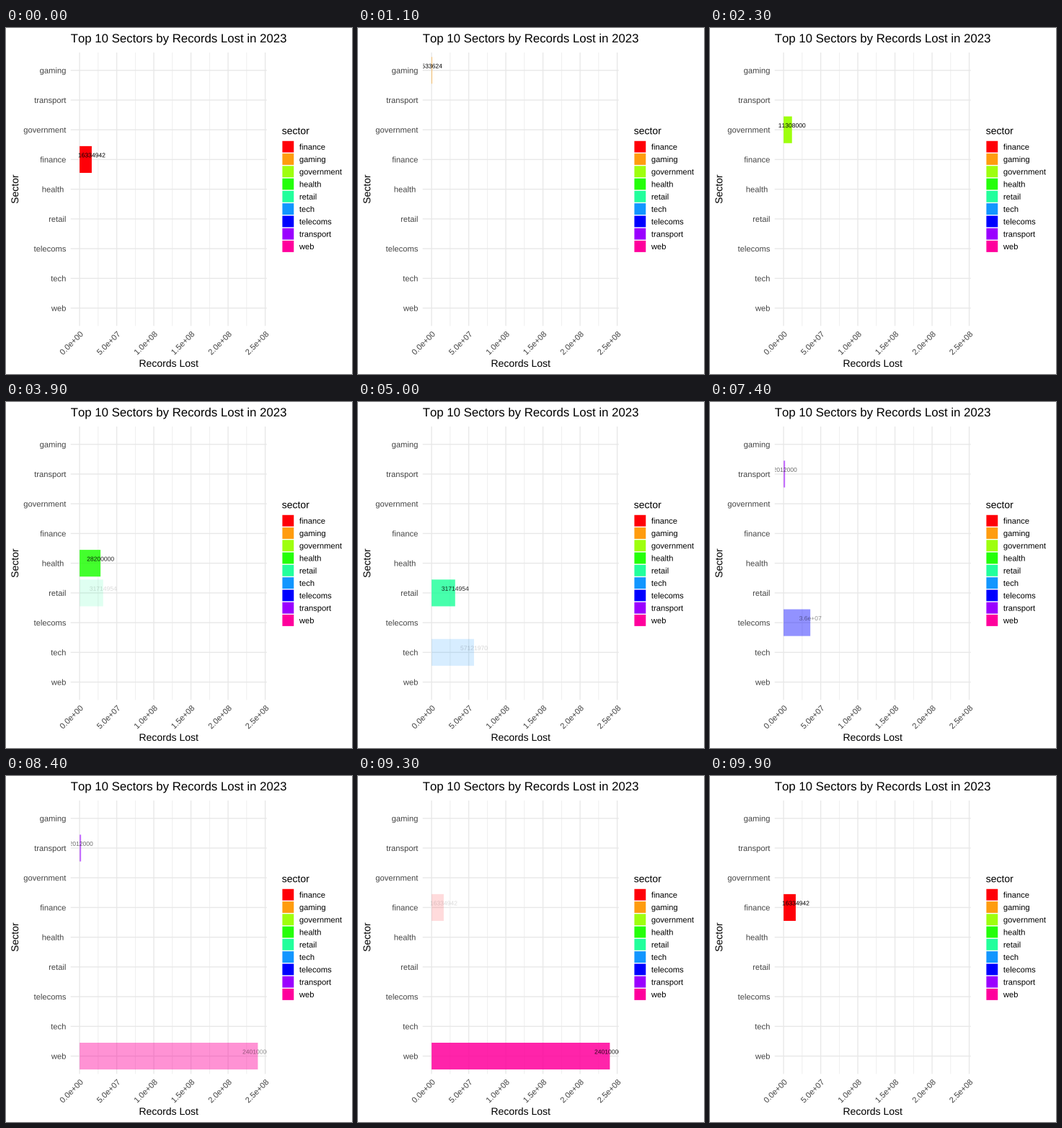
A matplotlib script for the animation above (10000 ms loop, 480 by 480 pixels).

```python
import matplotlib.pyplot as plt
from matplotlib.animation import FuncAnimation
from matplotlib.patches import PathPatch, Rectangle
from matplotlib.textpath import TextPath
from matplotlib.transforms import Affine2D

plt.rcParams["text.kerning_factor"] = 12  # plain advance widths, no kerning

SIZE = 480
FRAMES, INTERVAL = 100, 100
LEFT, RIGHT, TOP, BOTTOM = 89.7, 361.7, 34.0, 413.3
X0, PX_PER_UNIT = 102.1, 51.5 / 5e7
ROW = (BOTTOM - TOP) / 9.2
CAP = 0.72  # cap height in em
GRID, TICK = "#e8e8e8", "#444444"

# sector: (value, label, colour, row from the top)
SECTORS = {
    "finance": (16334942, "16334942", "#ff0008", 3),
    "gaming": (533624, "533624", "#ff9c0e", 0),
    "government": (11308000, "11308000", "#9eff0e", 2),
    "health": (28200000, "28200000", "#24ff0a", 4),
    "retail": (31714954, "31714954", "#22ff9c", 5),
    "tech": (57121970, "57121970", "#1296ff", 7),
    "telecoms": (36000000, "3.6e+07", "#0000ff", 6),
    "transport": (2012000, "2012000", "#9a00ff", 1),
    "web": (240100000, "240100000", "#ff009c", 8),
}
# first frame and length of the fade that leaves each sector
FADES = [(4, 8), (16, 8), (28, 7), (39, 7), (50, 6),
         (60, 7), (71, 7), (82, 7), (93, 7)]

fig = plt.figure(figsize=(4.8, 4.8), dpi=100, facecolor="white")
ax = fig.add_axes([0, 0, 1, 1])
ax.set(xlim=(0, SIZE), ylim=(SIZE, 0))
ax.axis("off")


def x_of(value):
    return X0 + value * PX_PER_UNIT


def y_of(row):
    return TOP + (row + 0.6) * ROW


def glyphs(s, size):
    return TextPath((0, 0), s, size=size, prop={"family": "Liberation Sans"})


def advance(s, size):
    end = lambda t: glyphs(t, size).get_extents().x1
    return end(s + "|") - end("|")


def text(x, y, s, size, color="black", h=0.0, v=0.0, angle=0, z=5):
    """Place s with h of its width and v of its cap height before (x, y)."""
    place = (Affine2D()
             .translate(-h * advance(s, size), -v * CAP * size)
             .rotate_deg(angle).scale(1, -1).translate(x, y))
    patch = PathPatch(place.transform_path(glyphs(s, size)),
                      fc=color, lw=0, zorder=z)
    return ax.add_patch(patch)


def box(x, y, w, h, color, z=3):
    return ax.add_patch(Rectangle((x, y), w, h, fc=color, lw=0,
                                  snap=False, zorder=z))


def rule(xs, ys, px):
    ax.plot(xs, ys, color=GRID, lw=px * 0.72, snap=False,
            solid_capstyle="butt", zorder=1)


# grid and axis labels
for k in range(5):
    x = x_of((k + 0.5) * 5e7)
    rule((x, x), (TOP, BOTTOM), 0.68)
for name, (_, _, _, row) in SECTORS.items():
    y = y_of(row)
    rule((LEFT, RIGHT), (y, y), 1.36)
    shown = name + " " if name == "health" else name
    text(83.4, y, shown, 11.2, TICK, h=1, v=0.5)
for k in range(6):
    x = x_of(k * 5e7)
    rule((x, x), (TOP, BOTTOM), 1.36)
    mantissa, power = f"{k * 5e7:.1e}".split("e")
    text(x, 419.6, f"{mantissa}e{power}", 11.2, TICK, h=1, v=1, angle=45)

text(LEFT, 20, "Top 10 Sectors by Records Lost in 2023", 16.8)
text((LEFT + RIGHT) / 2, 470, "Records Lost", 14, h=0.5)
text(17.1, (TOP + BOTTOM) / 2, "Sector", 14, h=0.5, angle=90)

# legend
text(382.7, 147.3, "sector", 14)
for k, (name, (_, _, color, _)) in enumerate(SECTORS.items()):
    y = 164.7 + 17.28 * k
    box(383.4, y - 7.93, 15.86, 15.86, color)
    text(406.9, y, name, 11.2, v=0.5)

# bars with their value labels
panel = Rectangle((LEFT, TOP), RIGHT - LEFT, BOTTOM - TOP,
                  transform=ax.transData)
bars = []
for value, label, color, row in SECTORS.values():
    y = y_of(row)
    bar = box(X0, y - 0.45 * ROW, value * PX_PER_UNIT, 0.9 * ROW, color)
    tag = text(x_of(value), y, label, 8.535, h=0.5, v=-0.5)
    tag.set_clip_path(panel)
    bars.append((bar, tag))


def weights(frame):
    """Opacity of every sector at a frame."""
    alpha = [0.0] * len(bars)
    for k, (start, steps) in enumerate(FADES):
        if frame < start + steps:
            t = max(0, frame - start + 1) / steps
            alpha[k] = 1 - t
            alpha[(k + 1) % len(bars)] = t
            break
    return alpha


def draw(frame):
    for pair, a in zip(bars, weights(frame)):
        for artist in pair:
            artist.set_alpha(a)
            artist.set_visible(a > 0)
    return [artist for pair in bars for artist in pair]


anim = FuncAnimation(fig, draw, frames=FRAMES, interval=INTERVAL,
                     repeat=True, repeat_delay=0)
plt.show()
```
